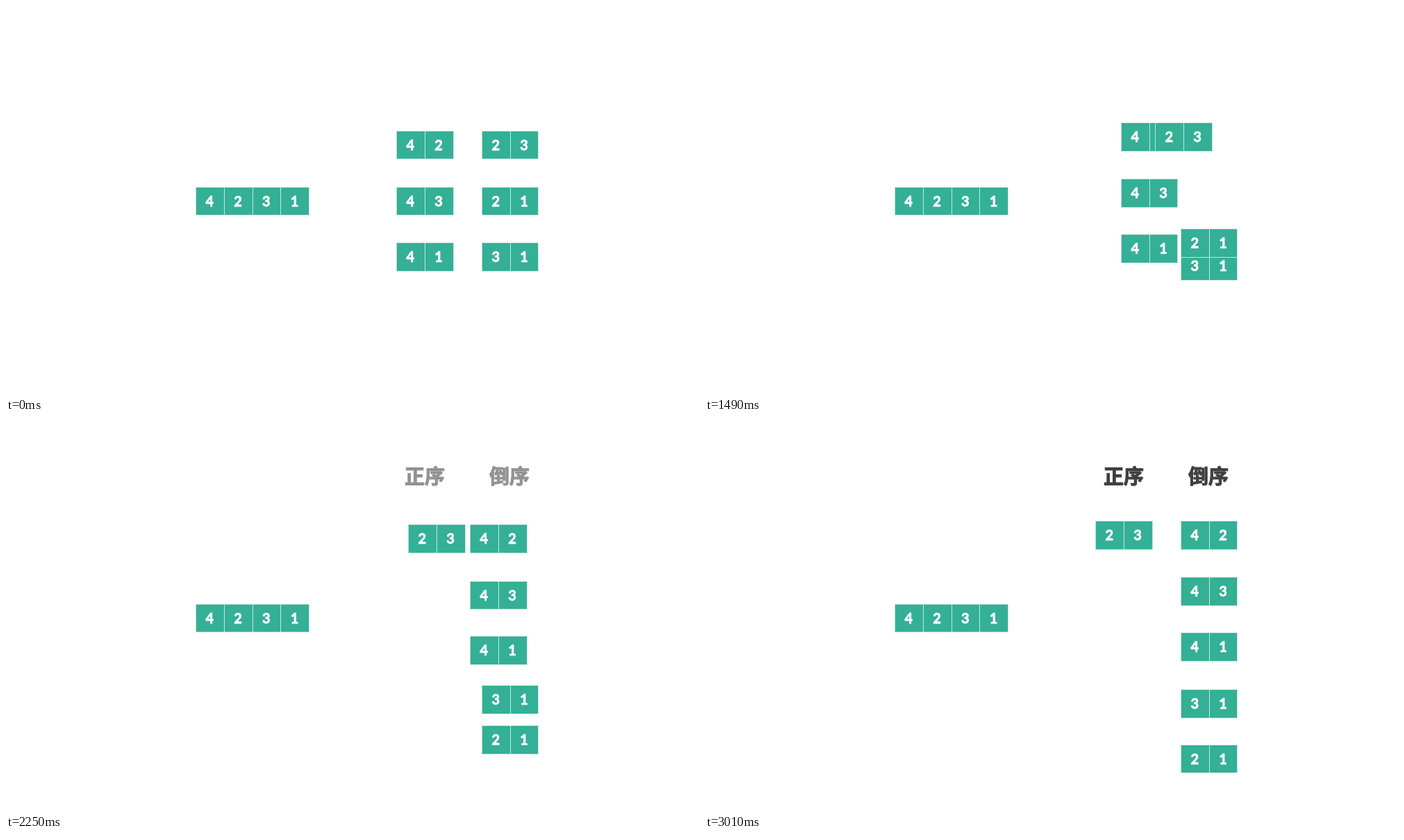
Recreate the animation shown at these times as an HTML page with a canvas. Size 998 px wide and 561 px high, loop 6.32 s.

```html
<!DOCTYPE html>
<html lang="zh">
<head>
<meta charset="utf-8">
<style>
html, body { margin: 0; width: 100%; height: 100%; overflow: hidden; background: #fff; }
canvas { display: block; }
</style>
</head>
<body>
<canvas id="stage" width="998" height="561"></canvas>
<script>
const ctx = document.getElementById('stage').getContext('2d');
const LOOP = 6320, STEP = 40, START = 1050, END = 3010;
const CELL = 40.75, HEIGHT = 40.7, LEFT = 562.4, RIGHT = 684.9;

// digits, start x, start y, end x, end y
const pairs = [
  ['42', LEFT, 179.7, RIGHT, 141.2],
  ['43', LEFT, 260.6, RIGHT, 222.3],
  ['41', LEFT, 340.9, RIGHT, 302.2],
  ['23', RIGHT, 179.7, LEFT, 141.2],
  ['31', RIGHT, 340.9, RIGHT, 384.4],
  ['21', RIGHT, 260.6, RIGHT, 463.7]
];

const clamp = v => Math.min(1, Math.max(0, v));
const mix = (a, b, p) => a + (b - a) * p;

// short acceleration up to the knee, then a long slowdown
function ease(u) {
  const knee = 0.2245, level = 0.298;
  return u < knee
    ? level * (u / knee) ** 1.63
    : 1 - (1 - level) * ((1 - u) / (1 - knee)) ** 2.36;
}

function drawText(text, x, y, font, color, weight) {
  ctx.font = font;
  ctx.fillStyle = ctx.strokeStyle = color;
  ctx.lineWidth = weight;
  ctx.lineJoin = 'miter';
  ctx.miterLimit = 3;
  ctx.strokeText(text, x, y);
  ctx.fillText(text, x, y);
}

function drawArray(digits, x, y) {
  const left = Math.round(x), top = Math.round(y);
  const width = Math.round(x + CELL * digits.length) - left;
  const height = Math.round(y + HEIGHT) - top;
  ctx.fillStyle = '#33b095';
  ctx.fillRect(left, top, width, height);
  ctx.strokeStyle = '#c4e2da';
  ctx.lineWidth = 1;
  ctx.strokeRect(left + 0.5, top + 0.5, width, height);
  [...digits].forEach((digit, i) => {
    if (i) {
      ctx.fillStyle = '#c4e9df';
      ctx.fillRect(Math.round(x + CELL * i), top, 1, height);
    }
    drawText(digit, left + CELL * (i + 0.5), top + 27.6, 'bold 20px Lato, sans-serif', '#fff', 0.8);
  });
}

function drawTitle(text, x, alpha) {
  // solid ink mixed with the white background, so stroke and fill stay even
  const shade = Math.round(mix(255, 63, alpha));
  drawText(text, x, 88, '900 29px "Noto Sans CJK SC", "Noto Sans CJK", sans-serif',
    `rgb(${shade},${shade},${shade})`, 1);
}

function draw(now) {
  const time = now % LOOP;
  const t = START + Math.floor((time - START) / STEP) * STEP;
  const p = ease(clamp((t - START) / (END - START)));
  const alpha = clamp((t - 1800) / 790);
  ctx.fillStyle = '#fff';
  ctx.fillRect(0, 0, 998, 561);
  ctx.textAlign = 'center';
  drawArray('4231', 273, 260.6);
  // the crossing pairs swap depth halfway
  const order = p < 0.5 ? pairs : [...pairs.slice(3), ...pairs.slice(0, 3)];
  for (const [digits, x0, y0, x1, y1] of order)
    drawArray(digits, mix(x0, x1, p), mix(y0, y1, p));
  drawTitle('正序', 603, alpha);
  drawTitle('倒序', 725, alpha);
}

const origin = performance.now();
function frame() {
  draw(performance.now() - origin);
  requestAnimationFrame(frame);
}
frame();
</script>
</body>
</html>
```
